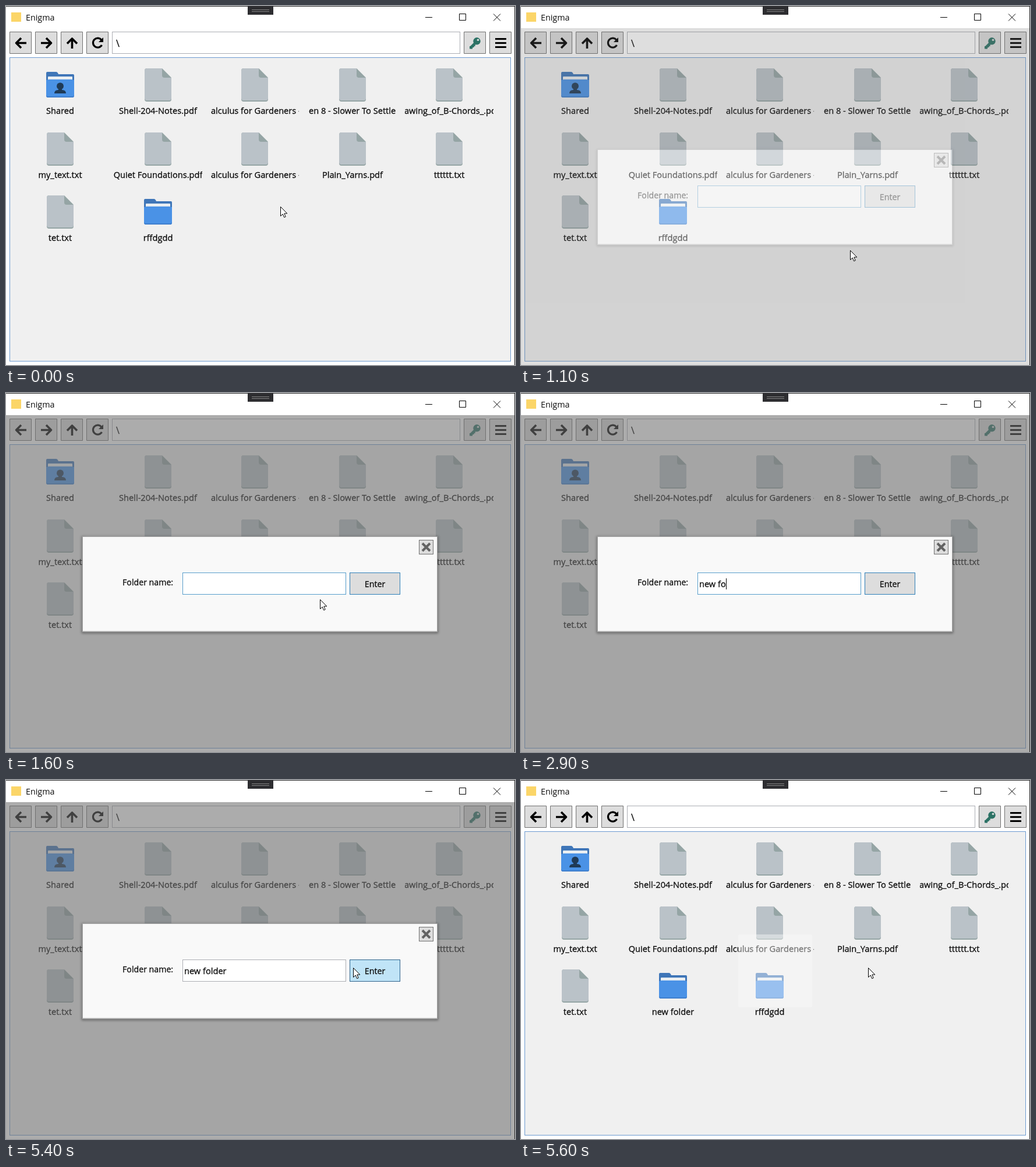
Recreate the animation shown at these times as an HTML page. Size 874 px wide and 616 px high, loop 5700 ms.

```html
<!DOCTYPE html>
<html lang="en">
<head>
<meta charset="utf-8">
<title>Enigma</title>
<style>
  html, body { margin: 0; width: 100%; height: 100%; overflow: hidden; background: #fff; }
  #stage { display: block; width: 100vw; height: 100vh; }
  text { font: 14.3px "Open Sans", "Noto Sans", sans-serif; fill: #0c0c0c; white-space: pre; }
  .strong text, text.strong { font-size: 14.6px; stroke: #0c0c0c; stroke-width: .3px; }
  .button { fill: #ddd; stroke: #707070; }
  .thick { fill: none; stroke: #000; stroke-width: 3.6; stroke-linejoin: round; }
  .thin { fill: none; stroke: #000; }
</style>
</head>
<body>
<svg id="stage" viewBox="0 0 874 616">
  <defs>
    <g id="file">
      <path d="M4 0H30L46 16V53a4 4 0 0 1-4 4H4a4 4 0 0 1-4-4V4A4 4 0 0 1 4 0Z" fill="#95a5a5"/>
      <path d="M4 0H30V12a4 4 0 0 0 4 4H46V51a4 4 0 0 1-4 4H4a4 4 0 0 1-4-4V4A4 4 0 0 1 4 0Z" fill="#bac2c8"/>
    </g>
    <g id="folder">
      <path d="M2 0H17q2 0 3 2l1 2H46q2 0 2 2V30H0V2Q0 0 2 0Z" fill="#3f76b8"/>
      <rect x="3" y="8" width="42" height="9" rx="1" fill="#e9eef2"/>
      <path d="M0 14H2L4 13H44L46 14H48V41q0 3-3 3H3q-3 0-3-3Z" fill="#4a92e6"/>
      <path d="M0 40q0 4 3 4H45q3 0 3-4q-1 2-3 2H3q-2 0-3-2Z" fill="#3f7fcd"/>
    </g>
    <g id="person" fill="#1f3a56">
      <circle cx="24" cy="24.5" r="6"/>
      <path d="M21 28h6v3q7 0 7 6H14q0-6 7-6Z"/>
    </g>
    <filter id="soft" x="-10%" y="-20%" width="120%" height="140%"><feGaussianBlur stdDeviation="2.2"/></filter>
    <linearGradient id="hot" x2="0" y2="1">
      <stop stop-color="#c8e2f1"/><stop offset="1" stop-color="#b7d9ec"/>
    </linearGradient>
  </defs>

  <rect width="874" height="616" fill="#fff"/>
  <rect x="9" y="11" width="17" height="16" fill="#fbd568"/>
  <text x="34" y="25">Enigma</text>
  <path class="thin" d="M720 19.5h12M778.5 13.5h11v11h-11ZM837 13.5l12 12M849 13.5l-12 12"/>

  <g class="button">
    <path d="M6.5 44.5h37v37h-37zM50.5 44.5h37v37h-37zM94.5 44.5h37v37h-37zM138.5 44.5h37v37h-37zM786.5 44.5h37v37h-37zM830.5 44.5h37v37h-37z"/>
  </g>
  <rect x="182.5" y="44.5" width="597" height="37" fill="#fff" stroke="#abadb3"/>
  <text class="strong" x="189" y="70" style="font-size:16px">\</text>
  <g class="thick">
    <path d="M35 63.5H18M26 55l-8.5 8.5L26 72"/>
    <path d="M60 63.5H77M69 55l8.5 8.5L69 72"/>
    <path d="M113.5 73V56M105 64.5l8.5-8.5 8.5 8.5"/>
    <path d="M164 58.5A8 8 0 1 0 164.5 67" stroke-width="3.2"/>
    <path d="M840 56.5h19M840 63.5h19M840 70.5h19" stroke-width="3"/>
  </g>
  <path d="M167 54v8h-8z"/>
  <path d="M805 64.5L797.5 72" stroke="#2c7265" stroke-width="4.6"/>
  <path d="M796 69v4.5h5v-2.5h2.5v-3h3" fill="#2c7265"/>
  <circle cx="808.5" cy="60.3" r="6.2" fill="#2c7265"/>
  <circle cx="810.5" cy="58.2" r="1.8" fill="#ddd"/>

  <rect x="6.5" y="88.5" width="860" height="521" fill="#f0f0f0" stroke="#6c9ad0"/>
  <g id="files" class="strong"></g>
  <g id="added" class="strong"></g>

  <g id="menu">
    <rect x="474" y="348" width="200" height="88" fill="#000" opacity=".6" filter="url(#soft)"/>
    <rect x="469.5" y="343.5" width="202" height="90" fill="#f5f5f5" stroke="#959595"/>
    <path d="M508.5 346v86" stroke="#e0e0e0"/>
    <path d="M509.5 346v86" stroke="#fff"/>
    <rect id="hover" x="473.5" width="193" height="27" fill="url(#hot)" stroke="#3f9bcd"/>
    <path d="M477 360.5h20M487 350.5v20" class="thick" style="stroke-width:4"/>
    <path d="M477 387l4-3v-4h3l3-2.5 3 2.5h3v4l4 3v9q0 2-2 2H479q-2 0-2-2Z"/>
    <path d="M482.5 382.5h9v6l-4.5 3-4.5-3Z" fill="#eee"/>
    <path d="M484 384.8h6M484 387.2h6" stroke="#000" stroke-width="1.2"/>
    <path d="M478 390.5l9 5.5 9-5.5" class="thin" style="stroke:#ddd"/>
    <path d="M479 409h6l2.5 2.5h7.500q2 0 2 2v8.500q0 2-2 2H479q-2 0-2-2V411q0-2 2-2Z"/>
    <path d="M483 417.500h8M487 413.500v8" stroke="#fff" stroke-width="2"/>
    <text x="517" y="366">Import file</text>
    <text x="517" y="394">New Text File</text>
    <text x="517" y="422">New Folder</text>
  </g>

  <g id="dialog">
    <path d="M0 38H873V616H0ZM131 246V410H741V246Z" fill="#6f6f6f" fill-opacity=".575" fill-rule="evenodd"/>
    <path d="M130 246H742V412H130ZM132 247V409H740V247Z" fill-rule="evenodd" opacity=".5" filter="url(#soft)"/>
    <rect x="131.5" y="246.500" width="609" height="162.500" fill="#f9f9f9" stroke="#a3a3a3"/>
    <rect class="button" x="709.5" y="252.500" width="24" height="24"/>
    <path d="M715 258l13 13M728 258l-13 13" class="thick" style="stroke:#626262;stroke-width:4"/>
    <text class="strong" x="200" y="330" style="font-size:14.2px">Folder name:</text>
    <rect id="field" x="303.5" y="308.500" width="280" height="37" fill="#fff"/>
    <text id="typed" class="strong" x="306" y="333"></text>
    <path id="caret" d="M.5 318v19" stroke="#000"/>
    <rect id="enter" x="590.5" y="308.500" width="86" height="37"/>
    <text class="strong" x="633.5" y="333" text-anchor="middle" style="font-size:14.2px">Enter</text>
  </g>
  <rect id="ghost" x="373" y="265" width="127" height="125" rx="3" fill="#f8f8f8" opacity=".45"/>

  <path d="M0 .5H874M873.500 0V616" stroke="#2b2b2b"/>
  <rect x="415" width="44" height="15" fill="#2d2d30"/>
  <path d="M422 6.500h30M422 9.500h30" stroke="#858585"/>

  <path id="arrow" d="M.5.500V16.500L4.200 13 6.700 18.700 9.200 17.600 6.800 12H11.800Z" fill="#fff" stroke="#000"/>
  <path id="beam" d="M-3-8h2.500l.5.500.5-.500H3M0-7.500v15M-3 8h2.500l.5-.500.5.500H3" class="thin"/>
</svg>

<script>
const $ = id => document.getElementById(id);
const columns = [93, 261, 427, 595, 761];
const rows = [107, 217, 325];

// A "left" value marks a long label cut at both sides of its cell.
function entry(col, row, label, { kind = "file", left } = {}) {
  const x = columns[col], y = rows[row];
  const icon = kind === "file"
    ? `<use href="#file" x="${x - 23}" y="${y}"/>`
    : `<use href="#folder" x="${x - 24}" y="${y + 6}"/>`;
  const badge = kind === "shared" ? `<use href="#person" x="${x - 24}" y="${y + 6}"/>` : "";
  const place = left === undefined ? `x="76" text-anchor="middle"` : `x="${left}"`;
  return `${icon}${badge}<svg x="${x - 76}" y="${y + 60}" width="152" height="28">
    <text ${place} y="18">${label}</text></svg>`;
}

const folder = { kind: "folder" };
const sums = "alculus for Gardeners -";
$("files").innerHTML = [
  entry(0, 0, "Shared", { kind: "shared" }),
  entry(1, 0, "Shell-204-Notes.pdf"),
  entry(2, 0, sums, { left: 1 }),
  entry(3, 0, "en 8 - Slower To Settle", { left: 1 }),
  entry(4, 0, "awing_of_B-Chords_.pdf", { left: -1 }),
  entry(0, 1, "my_text.txt"),
  entry(1, 1, "Quiet Foundations.pdf"),
  entry(2, 1, sums, { left: 1 }),
  entry(3, 1, "Plain_Yarns.pdf"),
  entry(4, 1, "tttttt.txt"),
  entry(0, 2, "tet.txt")
].join("");
const before = entry(1, 2, "rffdgdd", folder);
const after = entry(1, 2, "new folder", folder) + entry(2, 2, "rffdgdd", folder);

// time, x, y
const pointer = [
  [0, 471, 344], [300, 471, 344], [400, 498, 361], [500, 543, 384], [600, 571, 399],
  [700, 573, 409], [800, 566, 418], [1200, 565, 419], [1400, 558, 392], [1700, 530, 335],
  [1900, 520, 328], [4100, 520, 326], [4500, 591, 319], [4800, 596, 322], [5700, 596, 322]
];
const keyTimes = [2500, 2600, 2700, 2700, 2800, 2900, 3300, 3400, 3500, 3600];

function pointerAt(t) {
  const i = pointer.findIndex(p => p[0] > t);
  const [a, b] = [pointer[i - 1], pointer[i]];
  const k = (t - a[0]) / (b[0] - a[0]);
  return [1, 2].map(n => a[n] + (b[n] - a[n]) * k);
}

const show = (id, on) => $(id).setAttribute("visibility", on ? "visible" : "hidden");
const paint = (id, fill, stroke) => {
  $(id).setAttribute("fill", fill);
  $(id).setAttribute("stroke", stroke);
};

function dialogOpacity(t) {
  if (t < 5500) return Math.min(1, Math.max(0, (t - 970) / 330));
  return t < 5600 ? .5 : 0;
}

let drawn = -1;
function draw(t) {
  const [x, y] = pointerAt(t);
  const opacity = dialogOpacity(t);
  const inField = opacity === 1 && x > 303 && x < 584 && y > 308 && y < 346;
  const moving = t < 2500 || t >= 4100;
  show("arrow", moving && !inField);
  show("beam", moving && inField);
  for (const id of ["arrow", "beam"])
    $(id).setAttribute("transform", `translate(${Math.round(x)} ${Math.round(y)})`);

  const menuOpen = t >= 200 && t < 900;
  $("menu").setAttribute("opacity", t < 300 ? .6 : 1);
  show("menu", menuOpen);
  show("hover", menuOpen && t >= 400);
  const item = Math.min(2, Math.max(0, Math.floor((y - 346) / 28)));
  $("hover").setAttribute("y", 346.5 + 28 * item);

  $("dialog").setAttribute("opacity", opacity);
  show("ghost", t >= 5600);
  const clicked = t >= 5300;
  paint("field", "#fff", clicked ? "#abadb3" : "#569dcb");
  if (clicked) paint("enter", "#c0e4f7", "#2c628b");
  else if (t >= 4500) paint("enter", "#bee6fd", "#3c7fb1");
  else paint("enter", "#ddd", "#2e7fb8");

  const typed = $("typed");
  typed.textContent = "new folder".slice(0, keyTimes.filter(k => k <= t).length);
  show("caret", t >= 2500 && t < 3700);
  const caretX = t < 2500 ? 306 : 306 + Math.round(typed.getComputedTextLength());
  $("caret").setAttribute("transform", `translate(${caretX} 0)`);

  const list = t >= 5500 ? after : before;
  if ($("added").dataset.list !== list) {
    $("added").innerHTML = list;
    $("added").dataset.list = list;
  }
}

function tick() {
  const t = Math.floor(performance.now() % 5700 / 100) * 100;
  if (t !== drawn) draw(drawn = t);
  requestAnimationFrame(tick);
}
tick();
</script>
</body>
</html>
```
